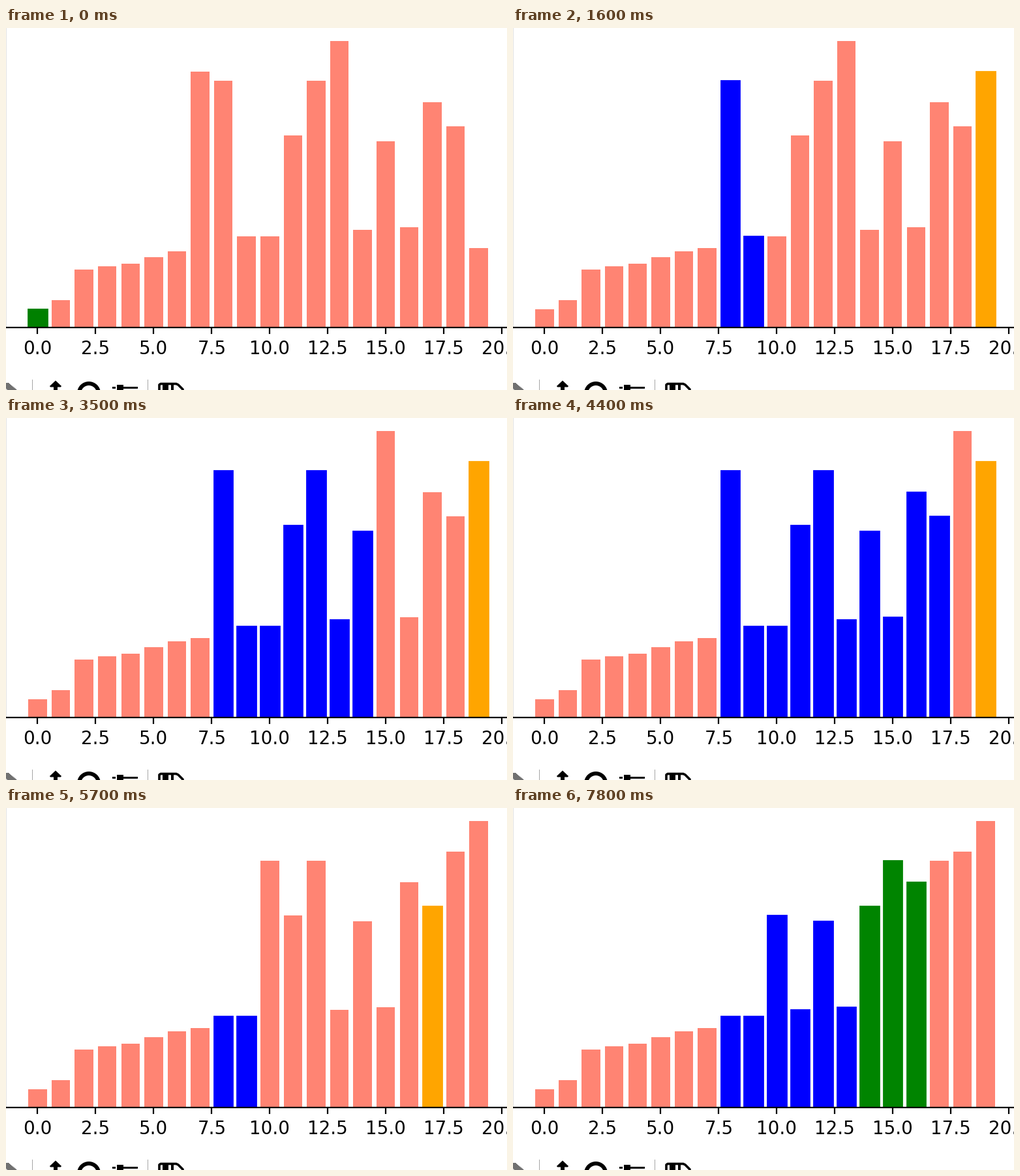
These frames come from a looping animation (768 by 556 pixels, 8 s). A matplotlib script:

```python
import matplotlib.pyplot as plt
from matplotlib.animation import FuncAnimation
from matplotlib.patches import Circle, Polygon, Rectangle

W, H, DPI = 768, 556, 200
INTERVAL, LOOP = 100, 8000
PX = 72 / DPI  # one pixel in points

VALUES = [6, 9, 19, 20, 21, 23, 25, 84, 81, 30, 30, 63, 81, 94, 32, 61, 33, 74, 66, 26]
STARTS = [0, 100, 200, 500, 800, 1300, 1600, 1900, 2300, 2600, 2900, 3200, 3500, 3800,
          4100, 4400, 4700, 5200, 5500, 5700, 6100, 6400, 6700, 7000, 7300, 7500, 7800]
BRIGHT = {"rest": "#ff8473", "less": "#0000ff", "more": "#008400", "pivot": "#ffa500"}
PLAIN = {"rest": "#fa8072", "less": "#0000ff", "more": "#008000", "pivot": "#ffa500"}


def paint(palette, lo=0, split=0, end=0, pivot=None):
    """Colours with lo..split-1 below the pivot and split..end-1 above it."""
    roles = ["rest"] * len(VALUES)
    roles[lo:split] = ["less"] * (split - lo)
    roles[split:end] = ["more"] * (end - split)
    if pivot is not None:
        roles[pivot] = "pivot"
    return [(role, palette[role]) for role in roles]


def partition(a, lo, hi, palette=BRIGHT):
    """Lomuto partition around the last element, one state per comparison."""
    split = lo
    for j in range(lo, hi):
        if a[j] <= a[hi]:
            a[split], a[j] = a[j], a[split]
            split += 1
        yield a[:], paint(palette, lo, split, max(split, j), hi)
    a[split], a[hi] = a[hi], a[split]
    yield a[:], paint(palette, lo, split, hi)


def build_states():
    a = VALUES[:]
    states = [(a[:], paint(dict(BRIGHT, more="#008000"), end=1))]
    states += list(partition(a, 7, 19, PLAIN))[-4:]
    states += partition(a, 8, 19)
    states += partition(a, 8, 17)
    return states


def draw_toolbar(ax):
    def poly(*points, color="black"):
        ax.add_patch(Polygon(points, closed=True, fc=color, ec="none"))

    def box(x0, y0, x1, y1, color="black"):
        ax.add_patch(Rectangle((x0, y0), x1 - x0, y1 - y0, fc=color, ec="none"))

    # disabled forward arrow, striped
    edge = Polygon([(0, 545), (4, 545), (18, 557), (3, 557), (0, 554)], fc="none", ec="none")
    ax.add_patch(edge)
    for shift in range(-18, 14, 2):
        stripe, = ax.plot([0, 20], [544 + shift, 564 + shift], color="black", lw=0.8 * PX)
        stripe.set_clip_path(edge)

    for x in (40, 217):
        box(x, 540, x + 1, H, "#a6a6a6")

    # pan
    poly((76, 541.5), (85, 550), (84, 551.5), (79, 551.5), (79, H), (73, H),
         (73, 551.5), (68, 551.5), (67, 550))
    # zoom
    ax.add_patch(Circle((127, 561), 15, fc="none", ec="black", lw=6 * PX))
    # sliders
    box(163, 551, 168, 554)
    box(170, 548, 180, 557)
    box(180, 551, 202, 554)
    # save
    ax.plot([235, 235, 237, 261, 264, 271, 271], [560, 548, 546.5, 546.5, 548, 555, 560],
            color="black", lw=3.6 * PX, solid_joinstyle="round")
    box(240, 546, 257, 557)
    box(249, 548, 253, 556, "white")


fig = plt.figure(figsize=(W / DPI, H / DPI), dpi=DPI, facecolor="white")
plt.rcParams["font.family"] = "DejaVu Sans"

ax = fig.add_axes([-1 / W, 96 / H, 775 / W, 462 / H])
bars = ax.bar(range(len(VALUES)), VALUES, width=0.8, linewidth=1)
ax.set_xlim(-1.39, 20.39)
ax.set_ylim(0, 98.7)
ax.set_xticks([2.5 * k for k in range(9)])
ax.set_yticks([])

bar_tools = fig.add_axes([0, 0, 1, 1])
bar_tools.axis("off")
draw_toolbar(bar_tools)
bar_tools.set_xlim(0, W)
bar_tools.set_ylim(H, 0)

STATES = build_states()


def update(frame):
    now = frame * INTERVAL
    index = sum(start <= now for start in STARTS) - 1
    for bar, height, (role, color) in zip(bars, *STATES[index]):
        bar.set_height(height)
        bar.set_facecolor(color)
        bar.set_edgecolor("none" if role == "rest" else color)
    return bars.patches


anim = FuncAnimation(fig, update, frames=LOOP // INTERVAL, interval=INTERVAL,
                     repeat=True, repeat_delay=0, blit=False)
plt.show()
```
